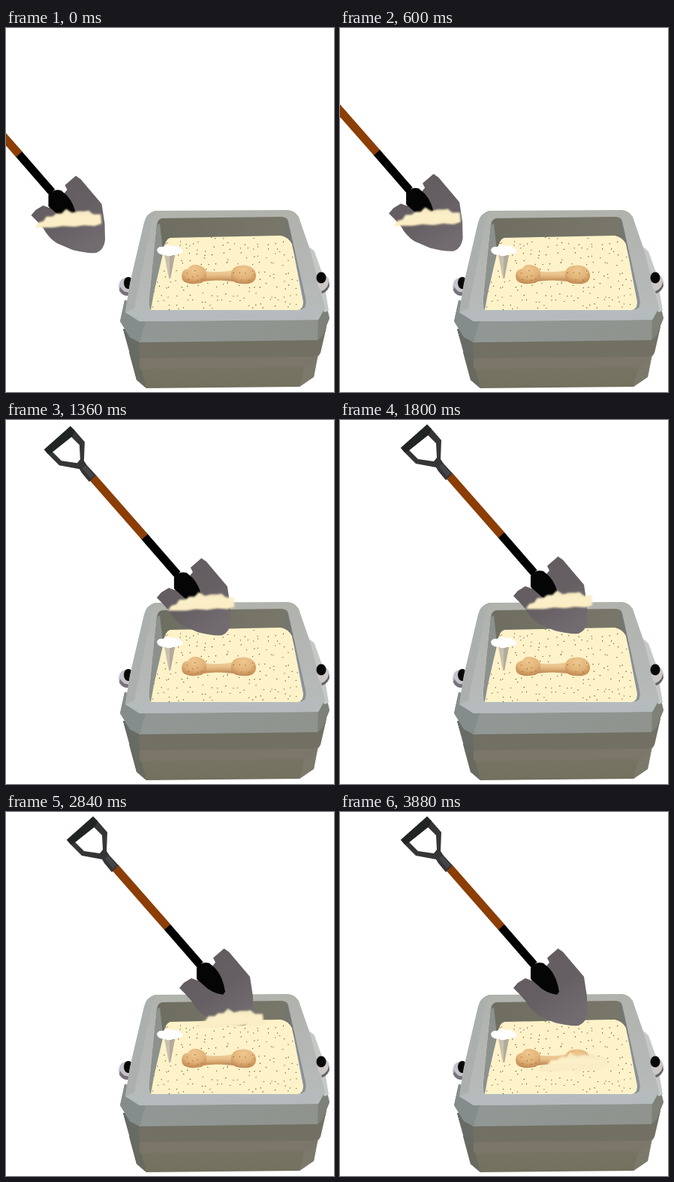
Write an HTML page that moves like this. It is 437x484 px and loops after 5980 ms.

```html
<!DOCTYPE html>
<html lang="en">
<head>
<meta charset="utf-8">
<title>Shovel and sandbox</title>
<style>
  html, body { margin: 0; width: 100%; height: 100%; overflow: hidden; background: #fff; }
  svg { display: block; width: 100%; height: 100%; }
</style>
</head>
<body>
<svg viewBox="0 0 437 484">
  <defs>
    <linearGradient id="rim" x1="0" y1="0" x2="0" y2="1">
      <stop offset="0" stop-color="#b0b2ac"/><stop offset="1" stop-color="#b7bbbb"/>
    </linearGradient>
    <linearGradient id="front" x1="0" y1="0" x2="1" y2="0">
      <stop offset="0" stop-color="#929896"/><stop offset="1" stop-color="#8f938d"/>
    </linearGradient>
    <linearGradient id="wall" x1="0" y1="0" x2="1" y2="0">
      <stop offset="0" stop-color="#6d6d60"/><stop offset="1" stop-color="#7a786a"/>
    </linearGradient>
    <linearGradient id="base" x1="0" y1="0" x2="0" y2="1">
      <stop offset="0" stop-color="#7a7769"/><stop offset="1" stop-color="#72705e"/>
    </linearGradient>
    <linearGradient id="steel" x1="0" y1="0" x2=".7" y2="1">
      <stop offset="0" stop-color="#625b5f"/><stop offset=".6" stop-color="#655f63"/><stop offset="1" stop-color="#726c70"/>
    </linearGradient>
    <radialGradient id="ball" cx=".5" cy=".25" r=".75">
      <stop offset="0" stop-color="#eec890"/><stop offset=".6" stop-color="#e2b378"/><stop offset="1" stop-color="#c08850"/>
    </radialGradient>
    <linearGradient id="shaft" x1="0" y1="0" x2="0" y2="1">
      <stop offset="0" stop-color="#f2d3a0"/><stop offset=".5" stop-color="#e6ba82"/><stop offset="1" stop-color="#bb8451"/>
    </linearGradient>
    <linearGradient id="heap" x1="0" y1="0" x2="0" y2="1">
      <stop offset="0" stop-color="#f3e7c0"/><stop offset=".5" stop-color="#fcf0c9"/><stop offset="1" stop-color="#fbecc2"/>
    </linearGradient>
    <filter id="soft" x="-5%" y="-15%" width="110%" height="130%"><feGaussianBlur stdDeviation=".8"/></filter>
    <clipPath id="bed"><path d="M219 279L366 276Q376 278 381 287L396 364Q396 374 389 375H193L197 352 209 300Q211 281 219 279Z"/></clipPath>
  </defs>

  <!-- left knob -->
  <ellipse cx="160" cy="344" rx="10" ry="12" fill="#c6c2ca"/>
  <path d="M151 349Q155 357 165 356L166 351Q157 353 152 344Z" fill="#77717b"/>
  <ellipse cx="163" cy="339" rx="6" ry="8" fill="#080808"/>

  <!-- box -->
  <path d="M164 431L174 468 187 479 391 477 410 464 417 428Z" fill="url(#base)"/>
  <path d="M164 431L174 468 187 479 180 452Z" fill="#686a60"/>
  <path d="M417 428L410 464 391 477 399 446Z" fill="#7b796a"/>
  <path d="M156 400L166 436 177 450 180 454 404 450 418 434 427 397Z" fill="#7b756a"/>
  <path d="M156 400L166 436 177 439 410 437 419 432 427 397Z" fill="#717063"/>
  <path d="M156 400L166 436 178 451 177 416Z" fill="#676b65"/>
  <path d="M158 362L152 390 165 411 178 418 415 415 422 408 431 386 426 365Z" fill="url(#front)"/>
  <path d="M158 362L152 390 165 411 178 418 186 390Z" fill="#858d8c"/>
  <path d="M426 365L431 386 422 408 415 415 416 388Z" fill="#7d8177"/>
  <path d="M389 250L404 291 411 297 422 328 430 376 424 378Z" fill="#c6c8c7"/>
  <path d="M199 243L376 242Q385 243 390 251L407 302 425 372 416 388 178 390 159 378 165 340 184 259Q187 246 199 243Z" fill="url(#rim)"/>
  <path d="M159 378L165 340 184 259Q187 246 199 243L195 253 171 373Z" fill="#abb0af"/>
  <path d="M159 378L190 375 401 373 425 372 416 388 178 390Z" fill="#b5bbbd"/>

  <!-- right knob -->
  <ellipse cx="423" cy="339" rx="8" ry="11" fill="#cdc8c6"/>
  <ellipse cx="420" cy="332" rx="6.500" ry="7.500" fill="#080808"/>
  <path d="M420 350Q429 347 430 337L431 343Q428 351 421 353Z" fill="#696469"/>

  <!-- inside -->
  <path d="M208 253L367 251Q374 251 376 257L399 360Q401 372 394 374H192L191 363 201 262Q202 254 208 253Z" fill="url(#wall)"/>
  <path d="M201 262L191 363 192 374H196L209 296 205 260Z" fill="#8b928d"/>
  <path d="M374 252L399 360Q401 372 394 374L390 350 379 290Z" fill="#86939a"/>
  <path d="M374 252L385 300 379 288 371 274Z" fill="#74756f"/>
  <g clip-path="url(#bed)">
    <rect x="185" y="270" width="215" height="110" fill="#fef2c9"/>
    <path id="specks" fill="#4c4434"/>
  </g>

  <!-- bone -->
  <path d="M262 323Q283 326 303 322V337Q283 334 262 337Z" fill="url(#shaft)"/>
  <path d="M234 329Q234 321 243 320 246 314 255 315 266 317 267 326 268 335 260 339 244 342 237 337 234 334 234 329Z" fill="url(#ball)"/>
  <path d="M300 328Q300 318 310 316 322 314 328 319 334 323 333 331 332 338 323 340 309 341 303 337 300 334 300 328Z" fill="url(#ball)"/>
  <path id="grains" fill="#83552a"/>

  <!-- pin -->
  <path d="M211 302H225L219 333H217Z" fill="#c8c1af"/>
  <path d="M218 302H225L219 333H218Z" fill="#b3ac9a"/>
  <path d="M201 295Q203 290 209 291 215 287 222 290 230 289 232 293 238 295 234 299 230 302 224 301 218 305 212 302 202 302 201 295Z" fill="#fff"/>

  <g id="shovel">
    <path d="M290.500 181.500L297 186 325 219 329 245 329.500 267Q328 280 318 284 305 285 286 280L265 271Q254 264 247 251L238 241 231 234 237 227 247 221 255 224 274 206 279 200 276 194Z" fill="url(#steel)"/>
    <path d="M214.500 152.500L258.500 203" stroke="#000" stroke-width="11"/>
    <path d="M254 207Q260 198 271 201L279 208Q289 219 292 239L289 243Q274 241 263 230L254 222Z" fill="#050505"/>
    <path d="M145.500 74L215 153" stroke="#8b3e06" stroke-width="11"/>
    <path fill-rule="evenodd" d="M81 37L116 6 122 12 135 27 134 52 138 58 150 71 141 80 131 68 128 63 101 58 86 43ZM92 40L104 52 125 55 129 50 128 31 117 20Z" fill="#353537"/>
    <path d="M81 37L116 6 122 12 119 19 90 42 86 43Z" fill="#202524"/>
    <path d="M134 60L145 73" stroke="#464447" stroke-width="6"/>
  </g>

  <g id="heap-pos">
    <path filter="url(#soft)" d="M39 265L43 259 50 257 54 251 62 251 67 247 74 247 80 241 88 246 96 244 105 244 110 243 116 248 126 248 127 260 118 263 104 262 91 264 76 263 63 265 46 265Z" fill="url(#heap)" stroke="#f2e3ba" stroke-width=".7"/>
  </g>
</svg>
<script>
  const $ = id => document.getElementById(id);
  const LOOP = 5980, STEP = 40, LAST = 3880;

  let seed = 17;
  const rand = () => (seed = seed * 16807 % 2147483647) / 2147483647;

  // jittered rows of small square specks
  function scatter(x0, y0, x1, y1, gap, keep) {
    let d = '';
    for (let y = y0; y < y1; y += gap)
      for (let x = x0; x < x1; x += gap) {
        const px = x + rand() * gap, py = y + rand() * gap;
        if (keep(px, py)) d += `M${px.toFixed(1)} ${py.toFixed(1)}h1.1v1.1h-1.1z`;
      }
    return d;
  }
  const inBall = (x, y, cx) => ((x - cx) / 15) ** 2 + ((y - 328) / 10) ** 2 < 1;
  $('specks').setAttribute('d', scatter(194, 278, 394, 373, 10, () => true));
  $('grains').setAttribute('d', scatter(234, 316, 334, 340, 8, (x, y) => inBall(x, y, 251) || inBall(x, y, 316)));

  function ease(t, from, to) {
    const s = Math.min(1, Math.max(0, (t - from) / (to - from)));
    return s * s * (3 - 2 * s);
  }
  const move = (id, x, y) =>
    $(id).setAttribute('transform', `translate(${x.toFixed(2)} ${y.toFixed(2)})`);

  function draw(now) {
    const t = Math.min(LAST, Math.floor(now % LOOP / STEP) * STEP);
    const slide = ease(t, 215, 1735);
    const fall = ease(t, 2100, LAST);
    move('shovel', -197.5 * (1 - slide), 15 * (1 - slide));
    move('heap-pos', 209 * slide + 18 * fall, -14 * slide + 93 * fall);
  }

  const start = performance.now();
  function tick() {
    draw(performance.now() - start);
    requestAnimationFrame(tick);
  }
  tick();
</script>
</body>
</html>
```
